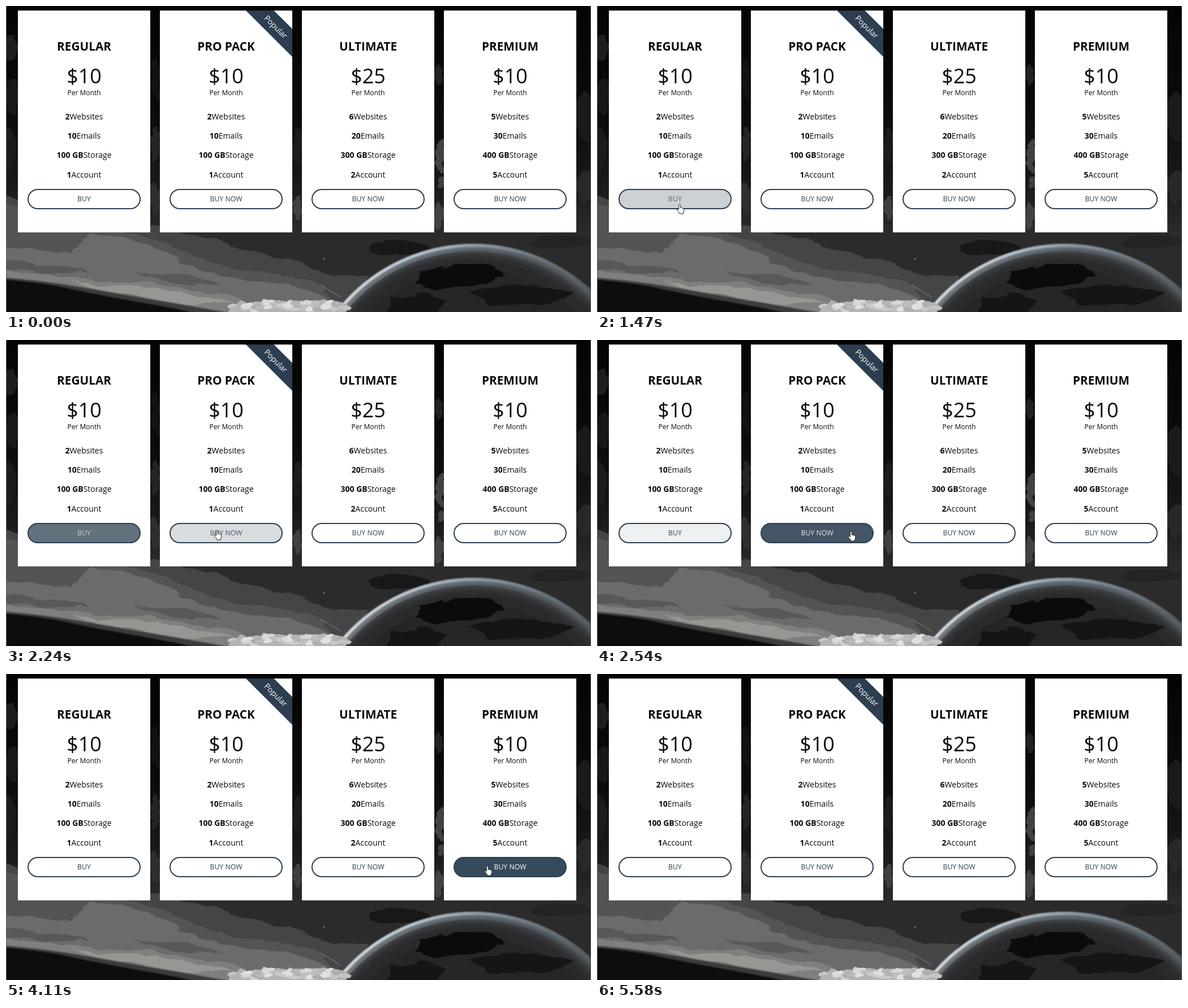
Recreate the animation shown at these times as an HTML page. Size 1034 by 542 pixels, loop 7.45 s.

```html
<!DOCTYPE html>
<html lang="en">
<head>
<meta charset="utf-8">
<title>Pricing table</title>
<style>
html, body { margin: 0; width: 100%; height: 100%; overflow: hidden; background: #060606; }
svg { position: absolute; left: 0; top: 0; width: 1034px; height: 542px; }
text { font-family: "Open Sans", "Noto Sans", sans-serif; text-anchor: middle; fill: #0a0a0a; }
.title { font-size: 20.8px; font-weight: 700; }
.price { font-size: 36px; }
.per { font-size: 12px; }
.item { font-size: 14px; }
.item tspan { font-weight: 700; }
.label { font-size: 12.3px; fill: #2c3e50; }
.ribbon { font-size: 14px; fill: #fff; }
.white { fill: #fff; }
.on { opacity: 0; animation: 7450ms ease infinite; }
#hand { animation: move 7450ms linear infinite; }

@keyframes buy0 {
  0%, 18.28% { opacity: 0; }
  26.34%, 28.75% { opacity: 1; }
  36.8%, 100% { opacity: 0; }
}
@keyframes buy1 {
  0%, 28.93% { opacity: 0; }
  36.44% { opacity: 1; }
  44.16%, 100% { opacity: 0; }
}
@keyframes buy2 {
  0%, 38.46% { opacity: 0; }
  45.91%, 47.25% { opacity: 1; }
  55.17%, 100% { opacity: 0; }
}
@keyframes buy3 {
  0%, 47.65% { opacity: 0; }
  55.17%, 66.17% { opacity: 1; }
  74.77%, 100% { opacity: 0; }
}
@keyframes move {
  0%, 9.53% { transform: translate(135px, 543px); }
  13.42% { transform: translate(136px, 480px); }
  18.26% { transform: translate(145px, 361px); }
  19.73%, 20.54% { transform: translate(146px, 351px); }
  26.3% { transform: translate(152px, 345px); }
  27.9% { transform: translate(195px, 341px); }
  28.75% { transform: translate(240px, 338px); }
  29% { transform: translate(291px, 337px); }
  30.07%, 30.47% { transform: translate(373px, 337px); }
  34.09%, 34.49% { transform: translate(449px, 339px); }
  36.44% { transform: translate(490px, 341px); }
  38.46% { transform: translate(541px, 341px); }
  40.27% { transform: translate(635px, 339px); }
  41.9%, 46.04% { transform: translate(651px, 338px); }
  47.25% { transform: translate(741px, 340px); }
  47.7% { transform: translate(791px, 340px); }
  49.66% { transform: translate(848px, 340px); }
  51%, 63.89% { transform: translate(851px, 340px); }
  66.17% { transform: translate(856px, 361px); }
  73.69%, 100% { transform: translate(875px, 543px); }
}
</style>
</head>
<body>
<svg viewBox="0 0 1034 542">
  <defs>
    <linearGradient id="sky" x2="0" y2="1">
      <stop offset="0" stop-color="#040404"/>
      <stop offset=".35" stop-color="#0b0b0b"/>
      <stop offset=".6" stop-color="#1b1b1b"/>
      <stop offset=".74" stop-color="#2b2b2b"/>
      <stop offset="1" stop-color="#2b2b2b"/>
    </linearGradient>
    <radialGradient id="globe" gradientUnits="userSpaceOnUse" cx="826" cy="727" r="306">
      <stop offset=".82" stop-color="#262626"/>
      <stop offset=".92" stop-color="#2e2e2f"/>
      <stop offset=".965" stop-color="#45494d"/>
      <stop offset="1" stop-color="#75808a"/>
    </radialGradient>
    <linearGradient id="rim" gradientUnits="userSpaceOnUse" x1="590" x2="1034">
      <stop offset="0" stop-color="#d6dbdf"/>
      <stop offset=".3" stop-color="#b9c5ce"/>
      <stop offset=".6" stop-color="#8492a0"/>
      <stop offset="1" stop-color="#55585b"/>
    </linearGradient>
    <filter id="rough" filterUnits="userSpaceOnUse" x="-40" y="-20" width="1114" height="600" color-interpolation-filters="sRGB">
      <feTurbulence type="fractalNoise" baseFrequency=".02 .06" numOctaves="3" seed="4"/>
      <feDisplacementMap in="SourceGraphic" scale="15" xChannelSelector="R" yChannelSelector="G"/>
    </filter>
    <filter id="soft" filterUnits="userSpaceOnUse" x="-40" y="380" width="1140" height="200">
      <feGaussianBlur stdDeviation="1"/>
    </filter>
  </defs>

  <rect width="1034" height="542" fill="url(#sky)"/>
  <g filter="url(#rough)">
    <g id="spots"></g>
    <path fill="#454545" d="M-40 322L20 342 100 370 250 392 330 402 420 432 500 447 560 472 640 478 600 560H-40z"/>
    <path fill="#545454" d="M-40 340L20 355 90 385 170 395 260 412 330 440 400 466 500 480 560 496 600 560H-40z"/>
    <path fill="#6b6b6b" d="M-40 426L60 430 115 438 150 404 200 408 260 424 300 448 350 470 420 486 500 492 560 514 600 540 500 570H-40z"/>
    <path fill="#585858" d="M-40 448L70 456 150 472 70 472-40 464zM230 472L330 478 390 496 300 490z"/>
    <path fill="#7f7f7e" d="M-40 468L60 474 150 484 250 490 340 505 420 518 420 560H-40z"/>
    <path fill="#969692" d="M110 490L230 496 320 512 400 522 350 530 230 516z"/>
  </g>
  <g filter="url(#soft)">
    <path fill="#3a3a3a" d="M-20 480Q60 486 120 496T260 520 410 546H-20z"/>
    <path fill="#090909" d="M-20 483Q60 489 110 500T240 525 350 548H-20z"/>
    <circle cx="826" cy="727" r="306" fill="url(#globe)"/>
    <circle cx="826" cy="727" r="299" fill="none" stroke="url(#rim)" stroke-width="13" opacity=".28"/>
    <circle cx="826" cy="727" r="303" fill="none" stroke="url(#rim)" stroke-width="5"/>
  </g>
  <g filter="url(#rough)">
    <path fill="#0b0b0b" d="M735 470L790 458 850 460 885 474 850 490 800 494 760 505 720 490z"/>
    <path fill="#151515" d="M820 506L880 494 940 496 1000 512 960 528 860 532z"/>
    <path fill="#151515" d="M680 520L740 510 780 522 750 560 670 560z"/>
    <path fill="#b4b4b4" d="M395 532L440 520 480 526 530 520 575 523 600 528 602 560H395z"/>
    <g id="puffs"></g>
  </g>
  <path d="M556 494l36 22" stroke="#777" stroke-width="2" opacity=".6"/>
  <circle cx="562" cy="448" r="1.6" fill="#777"/>
  <path d="M.5 0V542M1033.5 0V542" stroke="#666"/>
</svg>

<svg viewBox="0 0 1034 542">
  <g id="cards"></g>
  <path fill="#2c3e50" d="M424 8H473.5L506 40.5V90z"/>
  <text class="ribbon" transform="translate(477 37) rotate(45)" y="5">Popular</text>
  <g id="hand">
    <path fill="#fff" stroke="#222" stroke-linejoin="round" d="M-1.5 9.5V1.4a1.4 1.4 0 0 1 2.8 0V6l2.3.4 2.2.7q2 .5 2 2.2V12l-1.3 3v2H-.3V15.4L-4.8 10.2Q-5.2 8.2-3.2 8.4z"/>
  </g>
</svg>

<script>
const $ = id => document.getElementById(id);
const ellipse = (x, y, rx, ry, g) =>
  `<ellipse cx="${x}" cy="${y}" rx="${rx}" ry="${ry}" fill="rgb(${g},${g},${g})"/>`;

// Grey patches in the night sky
$('spots').innerHTML = [
  [6, 75, 12, 24, 30], [12, 160, 12, 34, 24], [4, 255, 14, 40, 28],
  [264, 130, 8, 40, 18], [264, 245, 8, 30, 36], [264, 340, 9, 30, 46],
  [515, 250, 8, 32, 28], [514, 358, 7, 22, 64],
  [766, 122, 8, 17, 34], [767, 265, 8, 28, 66], [767, 312, 6, 10, 64], [766, 372, 8, 24, 66],
  [1022, 195, 16, 45, 26], [1024, 318, 18, 30, 40],
  [695, 428, 55, 13, 24], [985, 418, 60, 10, 36]
].map(s => ellipse(...s)).join('');

// Bright cloud on the horizon
let puffs = '';
for (let i = 0; i < 36; i++) {
  const u = i / 35;
  puffs += ellipse(402 + 196 * u, 531 + 6 * Math.sin(i * 2.4),
    10 + 4 * Math.sin(i * 1.7), 5 + 2 * Math.cos(i * 3.1), Math.round(200 + 26 * Math.sin(i * 5.3)));
}
$('puffs').innerHTML = puffs;

const plans = [
  ['REGULAR', '$10', [2, 10, '100 GB', 1], 'BUY'],
  ['PRO PACK', '$10', [2, 10, '100 GB', 1], 'BUY NOW'],
  ['ULTIMATE', '$25', [6, 20, '300 GB', 2], 'BUY NOW'],
  ['PREMIUM', '$10', [5, 30, '400 GB', 5], 'BUY NOW']
];
const units = ['Websites', 'Emails', 'Storage', 'Account'];
const text = (cls, y, str, attr = '') => `<text class="${cls}" y="${y}" ${attr}>${str}</text>`;
const pill = attr => `<rect x="-99" y="325" width="198" height="34" rx="17" ${attr}/>`;

$('cards').innerHTML = plans.map(([name, price, counts, label], i) => {
  const fade = `style="animation-name:buy${i}"`;
  return `<g transform="translate(${138 + 251 * i} 0)">
    <rect x="-117" y="8" width="234" height="393" fill="#fff"/>
    ${text('title', 79, name)}${text('price', 137, price)}${text('per', 158, 'Per Month')}
    ${counts.map((n, k) => text('item', 201 + 34.2 * k, `<tspan>${n}</tspan>${units[k]}`)).join('')}
    ${pill(`class="on" fill="#374a5b" ${fade}`)}
    ${pill('fill="none" stroke="#2c3e50" stroke-width="2"')}
    ${text('label', 346, label)}${text('label white on', 346, label, fade)}
  </g>`;
}).join('');
</script>
</body>
</html>
```
